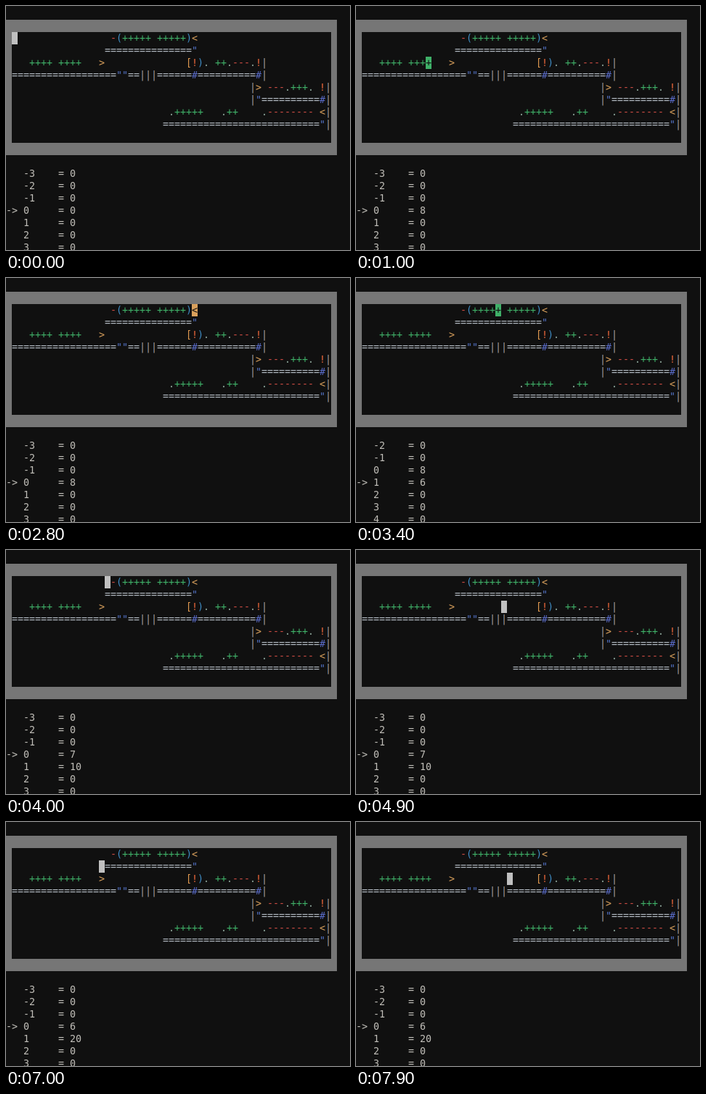
Write an HTML page that moves like this. It is 474x337 px and loops after 8000 ms.

```html
<!DOCTYPE html>
<html lang="en">
<head>
<meta charset="utf-8">
<title>Grid program debugger</title>
<style>
  html, body { margin: 0; width: 100%; height: 100%; overflow: hidden; background: #101010; }
  #stage {
    position: relative; width: 474px; height: 337px; overflow: hidden;
    font: 13.333px/17px "DejaVu Sans Mono", monospace;
    font-variant-ligatures: none; color: #c0beb8;
  }
  pre, #cursor { position: absolute; margin: 0; font: inherit; white-space: pre; }
  #frame {
    position: absolute; left: 0; top: 19px; width: 440px; height: 153px;
    border: solid #767676; border-width: 17px 8px;
  }
  #code { left: 0; top: 0; }
  #cursor { width: 8px; height: 17px; color: #101010; }
  #memory { left: 0; top: 223px; }
  .cell { position: absolute; height: 17px; }
  /* walls have a cool left edge and a warm right edge */
  .wall {
    color: transparent;
    background: linear-gradient(90deg, #5f9be0 4px, #e8a860 4px);
    -webkit-background-clip: text; background-clip: text;
  }
</style>
</head>
<body>
<div id="stage">
  <div id="frame"><pre id="code"></pre><div id="cursor"></div></div>
  <pre id="memory"></pre>
</div>
<script>
const LOOP = 8000, TICK = 100, STEP = 80, PHASE = 60;
const CELL_W = 8, CELL_H = 17;
const sp = n => ' '.repeat(n), floor = n => '='.repeat(n);

const program = [
  sp(17) + '-(+++++ +++++)<',
  sp(16) + floor(15) + '"',
  '   ++++ ++++   >' + sp(14) + '[!). ++.---.!|',
  floor(18) + '""==|||' + floor(6) + '#' + floor(10) + '#|',
  sp(41) + '|> ---.+++. !|',
  sp(41) + '|"' + floor(10) + '#|',
  sp(27) + '.+++++   .++    .-------- <|',
  sp(26) + floor(27) + '"|'
];

const colors = {
  '+': '#3fb068', '-': '#cc4c44', '=': '#b4bcc4', '"': '#5474c8', '#': '#5a6cc8',
  '(': '#3f8cc4', ')': '#3f8cc4', '.': '#8fa89c', '!': '#f0683c', '[': '#e09a50',
  '<': '#d9a05c', '>': '#d9a05c', ' ': '#c0c0c0'
};

const at = (x, y) => (program[y] || '')[x] || ' ';
const isSolid = char => '="#|'.includes(char);

// Walk the program: gravity, floors, and lifts that run from # up to ".
function run(count) {
  const s = { x: 0, y: 0, dir: 1, ptr: 0, cells: {}, stopped: false };
  const add = n => { s.cells[s.ptr] = (s.cells[s.ptr] || 0) + n; };
  const ops = {
    '+': () => add(1),
    '-': () => add(-1),
    ')': () => s.ptr++,
    '(': () => s.ptr--,
    '>': () => { s.dir = 1; },
    '<': () => { s.dir = -1; },
    '!': () => { s.stopped = true; }
  };
  const states = [];
  let lifting = false;
  for (let i = 0; i < count; i++) {
    states.push({ ...s, cells: { ...s.cells } });
    const below = at(s.x, s.y + 1);
    if (s.stopped && below === '#') lifting = true;
    if (lifting && below === '"') lifting = s.stopped = false;
    if (lifting) s.y--;
    else if (!isSolid(below)) s.y++;
    else s.x += s.dir;
    const op = ops[at(s.x, s.y)];
    if (op) op();
  }
  return states;
}

const codeEl = document.getElementById('code');
const cursor = document.getElementById('cursor');
const memory = document.getElementById('memory');

function place(el, x, y) {
  el.style.left = x * CELL_W + 'px';
  el.style.top = y * CELL_H + 'px';
}

// Each character starts on its own terminal cell.
function print(parent, lines, decorate) {
  parent.textContent = '';
  lines.forEach((line, y) => [...line].forEach((char, x) => {
    if (char === ' ') return;
    const span = document.createElement('span');
    span.className = 'cell';
    span.textContent = char;
    place(span, x, y);
    if (decorate) decorate(span, char);
    parent.append(span);
  }));
}

function memoryLines({ ptr, cells }) {
  const rows = [];
  for (let i = ptr - 3; i <= ptr + 3; i++) {
    rows.push((i === ptr ? '-> ' : '   ') + String(i).padEnd(6) + '= ' + (cells[i] || 0));
  }
  return rows;
}

print(codeEl, program, (span, char) => {
  if (char === '|') span.classList.add('wall');
  else span.style.color = colors[char];
});

const stepAt = t => Math.floor((Math.floor(t / TICK) * TICK + PHASE) / STEP);
const states = run(stepAt(LOOP - 1) + 1);
let shown = -1;

function draw(t) {
  const step = stepAt(t % LOOP);
  if (step === shown) return;
  shown = step;
  const state = states[step], char = at(state.x, state.y);
  place(cursor, state.x, state.y);
  cursor.style.background = colors[char];
  cursor.textContent = char;
  print(memory, memoryLines(state));
}

const start = performance.now();
function tick() {
  draw(performance.now() - start);
  requestAnimationFrame(tick);
}
tick();
</script>
</body>
</html>
```
